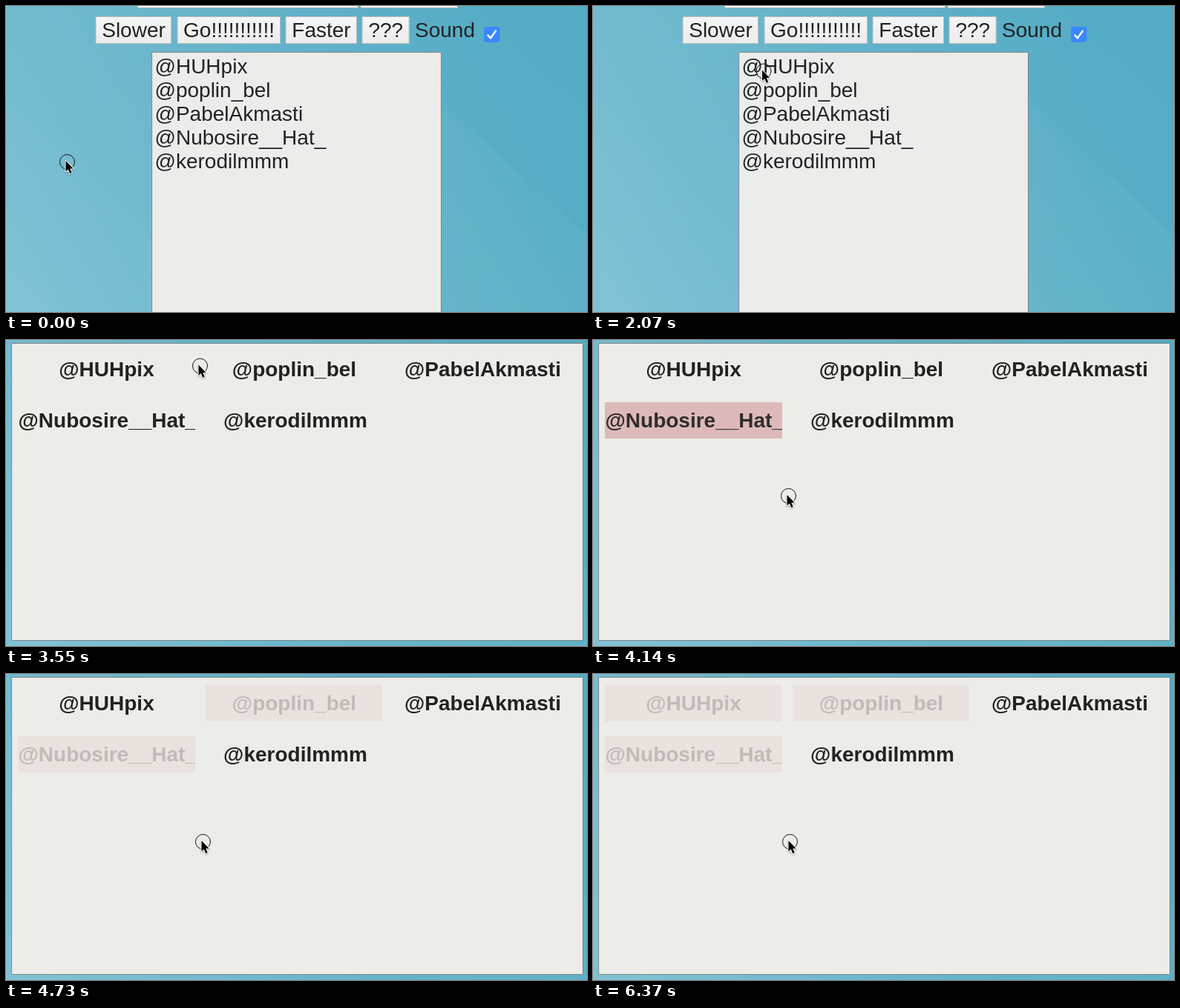
These frames come from a looping animation (783 by 413 pixels, 8 s). An HTML page with a canvas:

```html
<!DOCTYPE html>
<html lang="en">
<head>
<meta charset="utf-8">
<title>Name picker</title>
<style>
  html, body { margin: 0; width: 783px; height: 413px; overflow: hidden; }
  canvas { display: block; }
</style>
</head>
<body>
<canvas id="stage" width="783" height="413"></canvas>
<script>
const ctx = document.getElementById('stage').getContext('2d');
const LOOP = 8000, PICK_START = 3550;
const FONT = '28px "Liberation Sans", Arial, Helvetica, sans-serif';
const INK = '#222';
const names = ['@HUHpix', '@poplin_bel', '@PabelAkmasti', '@Nubosire__Hat_', '@kerodilmmm'];

// Left edge, top and moment of elimination for each name
const cells = [
  { x: 16, y: 15, out: 5930 },
  { x: 269, y: 15, out: 4290 },
  { x: 523, y: 15, out: Infinity },
  { x: 16, y: 84, out: 4140 },
  { x: 270.5, y: 84, out: Infinity }
];
const FADE = [0.93, 0.66, 0.36, 0.2], TICK = 146.5;

// Pointer ring centre: time, x, y (held until the next entry)
const path = [
  [0, 82.5, 210.5], [740, 83, 211], [890, 83.5, 210], [1190, 103.5, 203],
  [1340, 128, 191], [1480, 153, 176], [1630, 175, 158], [1780, 196, 136],
  [1930, 214, 112], [2070, 230, 88], [2220, 243, 68], [2360, 253, 50],
  [2510, 259, 38], [2960, 261.5, 35], [3850, 261.5, 75], [4000, 262, 150],
  [4140, 263.5, 210.5], [4290, 264.5, 223], [4440, 265.5, 226.5]
];

function box(x, y, w, h, fill, line) {
  ctx.fillStyle = fill;
  ctx.fillRect(x, y, w, h);
  if (!line) return;
  ctx.strokeStyle = line;
  ctx.lineWidth = 1;
  ctx.strokeRect(x + 0.5, y + 0.5, w - 1, h - 1);
}

function label(text, x, y, align = 'left', bold = false) {
  ctx.font = (bold ? 'bold ' : '') + FONT;
  ctx.textAlign = align;
  ctx.fillStyle = INK;
  ctx.fillText(text, x, y);
}

function gradient(x0, y0, x1, y1, ...colors) {
  const g = ctx.createLinearGradient(x0, y0, x1, y1);
  colors.forEach((c, i) => g.addColorStop(i / (colors.length - 1), c));
  return g;
}

function shape(d, fill) {
  ctx.fillStyle = fill;
  ctx.fill(new Path2D(d));
}

function backdrop() {
  box(0, 0, 783, 413, gradient(60, 413, 640, 60, '#7bc0d2', '#69b5cc', '#57adc6'));
  shape('M0 120 L300 413 H0Z', 'rgba(255,255,255,.012)');
  shape('M0 345 L68 413 H0Z', 'rgba(255,255,255,.02)');
  shape('M630 0 H783 V140Z', 'rgba(0,70,100,.02)');
  shape('M587 130 L783 310 V413 H587Z', 'rgba(255,255,255,.025)');
}

function button(text, x, w) {
  box(x, 14, w, 37, gradient(0, 14, 0, 51, '#f5f5f5', '#ececec'), '#bcc0c1');
  label(text, x + w / 2, 42, 'center');
}

function formScene() {
  box(177, -30, 298, 33, '#fff', '#a5a9aa');
  box(478, -30, 131, 33, '#efefef', '#b4b8b9');
  button('Slower', 121, 102);
  button('Go!!!!!!!!!!!', 231, 139);
  button('Faster', 377, 96);
  button('???', 480, 63.5);
  label('Sound', 551, 42);

  ctx.fillStyle = '#3b87fb';
  ctx.beginPath();
  ctx.roundRect(644, 28, 21.5, 21, 4);
  ctx.fill();
  ctx.strokeStyle = '#fff';
  ctx.lineWidth = 2.4;
  ctx.lineCap = ctx.lineJoin = 'round';
  ctx.stroke(new Path2D('M649.5 39.5 L653 43.5 L660 33.5'));

  box(196.5, 62, 390.5, 380, '#ececea', '#858585');
  names.forEach((name, i) => label(name, 200.5, 91 + 32 * i));
}

function pickScene(t) {
  box(7.5, 4, 770.5, 402, '#ecede8', '#7c8486');
  cells.forEach(({ x, y, out }, i) => {
    const wide = i === 3, w = wide ? 239 : 238;
    ctx.save();
    ctx.beginPath();
    ctx.rect(x, y, w, 49);
    ctx.clip();
    if (t >= out) {
      ctx.globalAlpha = FADE[Math.min(3, Math.floor((t - out) / TICK))];
      box(x, y, w, 49, '#ddb5b6');
    }
    label(names[i], wide ? x + 0.5 : x + 119.5, y + 34, wide ? 'left' : 'center', true);
    ctx.restore();
  });
}

function pointer(t) {
  const [, x, y] = path.findLast(p => t >= p[0]);
  const hand = t >= 2510 && t < PICK_START;
  ctx.save();
  ctx.translate(x, y);
  ctx.lineJoin = 'round';
  ctx.strokeStyle = '#111';
  ctx.lineWidth = 1;
  ctx.beginPath();
  ctx.arc(0, 0, 10, 0, 7);
  ctx.stroke();

  ctx.shadowColor = 'rgba(0,0,0,.35)';
  ctx.shadowBlur = 2;
  ctx.shadowOffsetY = 1;
  if (hand) {
    const palm = new Path2D('M-3 9 V1 Q-3-1-1.5-1 Q0-1 0 1 V6 Q2 4.5 3 6.5 Q5 5.5 6 7.5 Q8.5 7 8.5 9.5 V12 Q8 14 7 17 H-1 Q-3 14-7 9.5 Q-7 6.5-3 9Z');
    ctx.fillStyle = '#fff';
    ctx.fill(palm);
    ctx.shadowColor = 'transparent';
    ctx.stroke(palm);
    ctx.stroke(new Path2D('M1 11 V15 M3.5 11 V15 M6 11 V15'));
  } else {
    const arrow = new Path2D('M-2-1.5 V13 L1.3 10 L3.7 15.7 L6.2 14.6 L3.8 9 H8.2Z');
    ctx.strokeStyle = '#fff';
    ctx.lineWidth = 2;
    ctx.stroke(arrow);
    ctx.shadowColor = 'transparent';
    ctx.fillStyle = '#000';
    ctx.fill(arrow);
  }
  ctx.restore();
}

function draw(now) {
  const t = now % LOOP;
  backdrop();
  if (t < PICK_START) formScene();
  else pickScene(t);
  pointer(t);
}

const start = performance.now();
function frame() {
  draw(performance.now() - start);
  requestAnimationFrame(frame);
}
frame();
</script>
</body>
</html>
```
